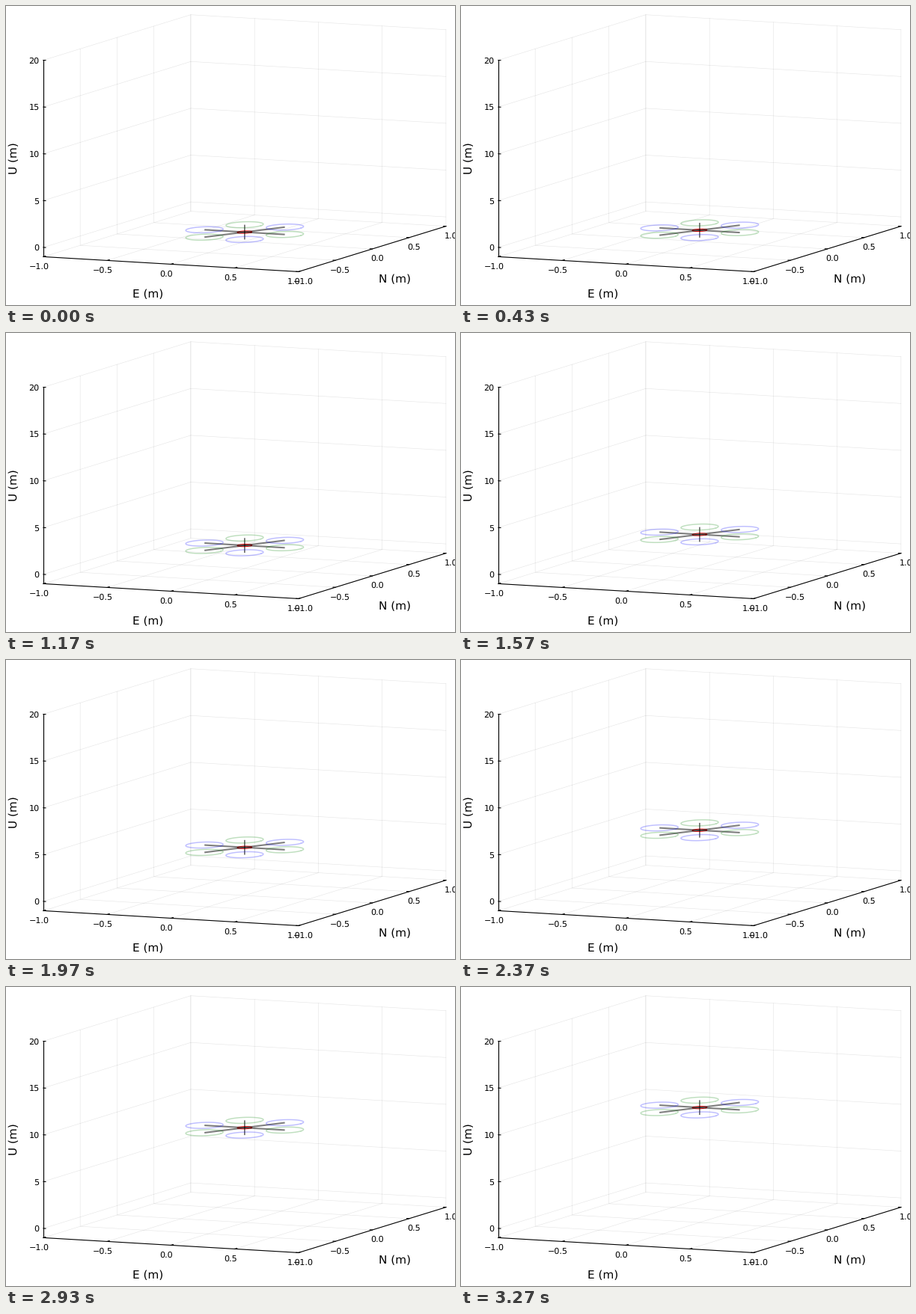
A matplotlib script that plays this animation: 600x400 px, repeating every 3310 ms.

```python
import numpy as np
import matplotlib.pyplot as plt
from matplotlib.animation import FuncAnimation

W, H, DPI = 600, 400, 100
PX = 72 / DPI  # points per pixel
LAST_STEP = 98

plt.rcParams["font.family"] = "DejaVu Sans"
plt.rcParams["text.hinting"] = "none"
fig = plt.figure(figsize=(W / DPI, H / DPI), dpi=DPI, facecolor="white")
ax = fig.add_axes([0, 0, 1, 1])
ax.set_xlim(0, W)
ax.set_ylim(H, 0)
ax.axis("off")


def project(e, n, u):
    """Orthographic view of east, north, up in stage pixels."""
    x = 318.9 + 170.5 * e + 98.5 * n
    y = 302.5 + 10 * e - 30.4 * n - 12.52 * u
    return x, y


def line(points, color="black", width=1.1, **kw):
    x, y = project(*np.array(points, float).T)
    return ax.plot(x, y, color=color, lw=width * PX, **kw)[0]


def label(x, y, text, size=8, **kw):
    kw = {"ha": "center", "va": "baseline", **kw}
    ax.text(x, y, text, fontsize=size, **kw)


def number(v):
    return f"{v:.1f}".replace("-", "\u2212")


def draw_axes():
    grid = dict(color="black", width=0.6, alpha=0.1, zorder=1)
    low, high = -1, 20
    for t in np.linspace(-1, 1, 5):
        line([(t, -1, low), (t, 1, low), (t, 1, high)], **grid)
        line([(1, t, low), (-1, t, low), (-1, t, high)], **grid)

        line([(t, -1, low), (t, -0.97, low)], zorder=2)
        x, y = project(t, -1, low)
        label(x - 6, y + 16.3, number(t))

        line([(1, t, low), (0.982, t, low)], zorder=2)
        x, y = project(1, t, low)
        label(x + 6.5, y + 16.3, number(t))

    for u in range(0, 21, 5):
        line([(-1, -1, u), (-1, 1, u), (1, 1, u)], **grid)
        line([(-1, -1, u), (-0.982, -1, u)], zorder=2)
        x, y = project(-1, -1, u)
        label(x - 5.4, y + 4.2, str(u), ha="right")

    line([(-1, -1, high), (-1, -1, low)], zorder=2)
    line([(-1, -1, low), (1, -1, low), (1, 1, low)], zorder=2)
    label(189.5, 390, "E (m)", 11)
    label(520, 370, "N (m)", 11)
    label(15, 204, "U (m)", 11, rotation=90, rotation_mode="anchor")


def circle(e, n, radius):
    a = np.linspace(0, 2 * np.pi, 61)
    return np.column_stack([e + radius * np.cos(a), n + radius * np.sin(a), 0 * a])


def draw_drone():
    arm, rotor, hub = 0.315, 0.127, 0.05
    parts = [line(circle(0, 0, hub), "red", 1.0, zorder=3)]
    for i in range(3):
        a = i * np.pi / 3
        tip = arm * np.array([np.cos(a), np.sin(a), 0])
        # the arm seen end-on to the view looks thinner and darker
        width, alpha = (1.5, 0.65) if i == 2 else (2.1, 0.5)
        parts.append(line([-tip, tip], "black", width, alpha=alpha, zorder=4,
                          solid_capstyle="butt"))
    for i in range(6):
        a = i * np.pi / 3
        color = "blue" if i % 2 else "green"
        ring = circle(arm * np.cos(a), arm * np.sin(a), rotor)
        parts.append(line(ring, color, 1.5, alpha=0.25, zorder=5))
    for p in parts:
        p.set_snap(False)
    return parts


draw_axes()
drone = draw_drone()
rest = [p.get_ydata().copy() for p in drone]


def climb(step):
    """Pixels risen: constant acceleration with a little drag."""
    return 0.01515 * step**2 - 4.5e-6 * step**3


def update(tick):
    # 30 steps per second on a 10 ms clock
    step = min((3 * tick + 1) // 10, LAST_STEP)
    for p, y in zip(drone, rest):
        p.set_ydata(y - climb(step))
    return drone


anim = FuncAnimation(fig, update, frames=331, interval=10, repeat=True,
                     repeat_delay=0, blit=True)
plt.show()
```
